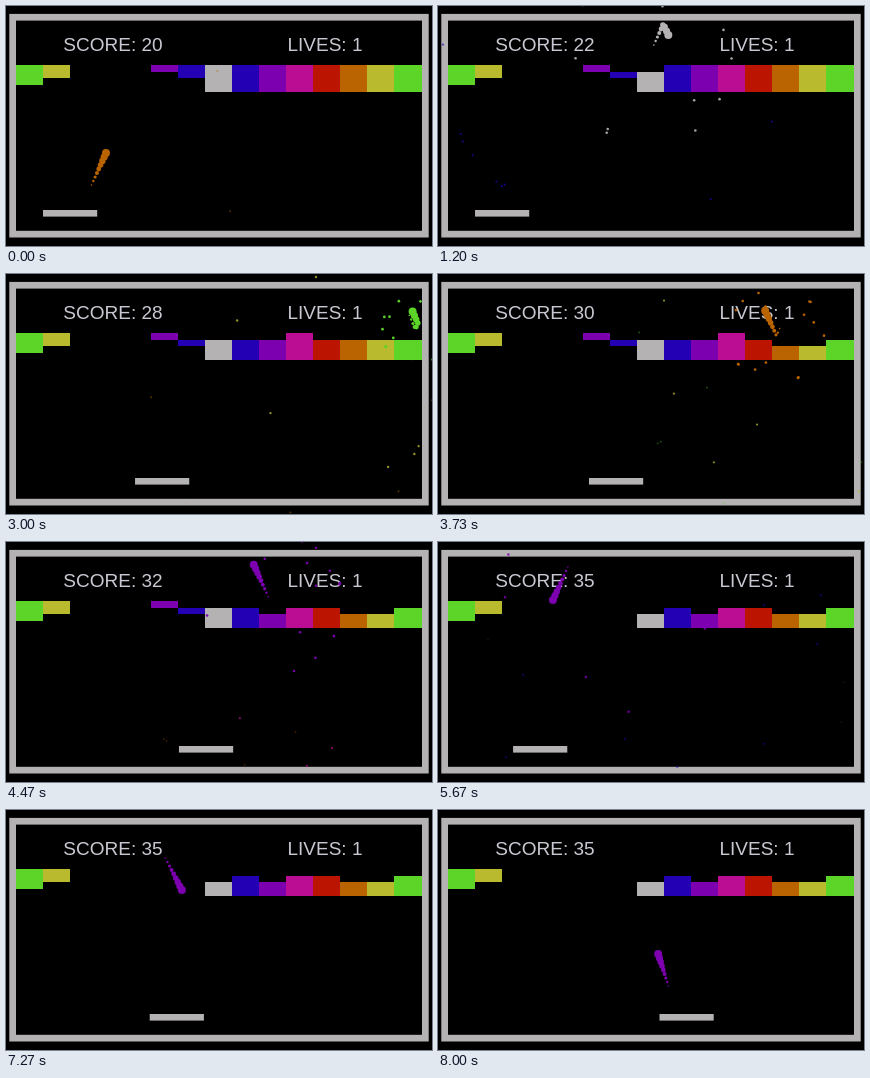
Animation, 426 px wide and 240 px high, one loop 8070 ms. Source, as an HTML page with a canvas:

```html
<!DOCTYPE html>
<html lang="en">
<head>
<meta charset="utf-8">
<title>Brick breaker</title>
<style>
  html, body { margin: 0; width: 100%; height: 100%; overflow: hidden; background: #000; }
  canvas { display: block; width: 100%; height: 100%; }
</style>
</head>
<body>
<canvas id="stage" width="426" height="240"></canvas>
<script>
const ctx = document.getElementById('stage').getContext('2d');
const LOOP = 8070, STEPS = 121, LIFE = 1100, DS = 0.5;
const WALL = { x: 10, y: 14.6, w: 406, h: 210.2, line: 6.7 };
const BRICK = { w: WALL.w / 15, h: 6.7, y: 59 };
const R = 4, TOP = 18, FLOOR = 200, RIGHT = 412;

const GREY = '#b4b2b2';
const PALETTE = [GREY, '#2400b4', '#7c00b0', '#bb0c94', '#bb1400', '#b96400', '#baba2e', '#5cd428'];
const colour = col => PALETTE[col < 7 ? 7 - col : col - 7];
const rows = [3, 2, 0, 0, 0, 1, 2, 4, 4, 4, 4, 4, 4, 4, 4];

// Key points: [time, ball travel] and [time, paddle x]
const clock = [[-221, 0], [0, 53], [1200, 341], [3000, 754], [4470, 1106],
  [5670, 1399], [6530, 1608], [8070, 1977]];
const paddle = [[0, 37], [1200, 37], [3000, 129], [4470, 173], [5670, 75],
  [6150, 10], [6530, 10], [7700, 221.5], [8070, 221.5]];

// Linear interpolation through key points
function follow(points, t) {
  let i = 1;
  while (i < points.length - 1 && points[i][0] < t) i++;
  const [t0, a] = points[i - 1], [t1, b] = points[i];
  return a + (b - a) * Math.min(1, (t - t0) / (t1 - t0));
}
const timeOf = travel => follow(clock.map(([t, s]) => [s, t]), travel);

// Play the game once: the ball leaves the paddle and bounces off walls and bricks
const path = [], hits = [{ t: -760, x: 80, y: 65, col: 2 }];
const slopes = [0.4525, 0.515, -0.32];
const gone = rows.map(() => 0);
let x = 76, y = FLOOR, down = -1, slope = slopes.shift();
for (let s = 0; s <= 1980; s += DS) {
  path.push([x, y]);
  x += slope * DS;
  y += down * DS;
  if (x > RIGHT) { x = 2 * RIGHT - x; slope = -slope; }
  if (y < TOP) { y = 2 * TOP - y; down = 1; }
  if (y > FLOOR) { y = 2 * FLOOR - y; down = -1; slope = slopes.shift(); }
  const col = Math.floor((x - WALL.x) / BRICK.w);
  const face = BRICK.y + gone[col] * BRICK.h - R;
  if (down > 0 && gone[col] < rows[col] && y > face && y < face + 2 * DS) {
    y = 2 * face - y;
    down = -1;
    gone[col]++;
    hits.push({ t: timeOf(s), x, y, col });
  }
}
const ballAt = t => path[Math.round(follow(clock, t) / DS)];

// Every hit throws out a ring of sparks that slow down
let seed = 7;
const random = () => (seed = seed * 16807 % 2147483647) / 2147483647;
for (const hit of hits) {
  hit.sparks = Array.from({ length: 15 }, () => {
    const a = random() * 2 * Math.PI, far = 300 * (1 - 0.5 * random() ** 3);
    return [far * Math.cos(a), far * Math.sin(a)];
  });
}

function disc(x, y, r) {
  ctx.beginPath();
  ctx.arc(x, y, r, 0, 2 * Math.PI);
  ctx.fill();
}

function drawField(t, done) {
  ctx.fillStyle = '#000';
  ctx.fillRect(0, 0, 426, 240);

  const { x, y, w, h, line } = WALL;
  ctx.strokeStyle = GREY;
  ctx.lineWidth = line;
  ctx.strokeRect(x - line / 2, y - line / 2, w + line, h + line);

  rows.forEach((count, col) => {
    const lost = done.filter(hit => hit.col === col).length;
    if (lost >= count) return;
    const left = Math.floor(x + col * BRICK.w), right = Math.floor(x + (col + 1) * BRICK.w);
    const top = Math.round(BRICK.y + lost * BRICK.h), end = Math.round(BRICK.y + count * BRICK.h);
    ctx.fillStyle = colour(col);
    ctx.fillRect(left, top, right - left, end - top);
  });

  ctx.fillStyle = GREY;
  ctx.fillRect(follow(paddle, t), 204, 54.2, 6.6);

  ctx.fillStyle = '#c8c8d2';
  ctx.font = '19px "Liberation Sans", Arial, sans-serif';
  ctx.textAlign = 'center';
  ctx.fillText('SCORE: ' + (19 + done.length), 107, 45);
  ctx.fillText('LIVES: 1', 319, 45);
}

function drawSparks(t, done) {
  for (const hit of done) {
    const age = t - hit.t, reach = 1 - Math.exp(-age / 600);
    if (age > LIFE) continue;
    ctx.fillStyle = colour(hit.col);
    ctx.globalAlpha = 1 - (age / LIFE) ** 1.5;
    for (const [dx, dy] of hit.sparks)
      disc(hit.x + dx * reach, hit.y + dy * reach, 1.4 - 0.6 * age / LIFE);
  }
  ctx.globalAlpha = 1;
}

function drawBall(t, done) {
  ctx.fillStyle = colour(done[done.length - 1].col);
  for (let i = 8; i >= 0; i--) disc(...ballAt(t - i * 16.7), R * (1 - i / 10));
}

function draw(t) {
  const done = hits.filter(hit => hit.t <= t);
  drawField(t, done);
  drawSparks(t, done);
  drawBall(t, done);
}

const start = performance.now();
function tick() {
  const t = (performance.now() - start) % LOOP;
  const step = Math.floor(t / LOOP * STEPS + 0.1) % STEPS;
  draw(step * LOOP / STEPS);
  requestAnimationFrame(tick);
}
tick();
</script>
</body>
</html>
```
